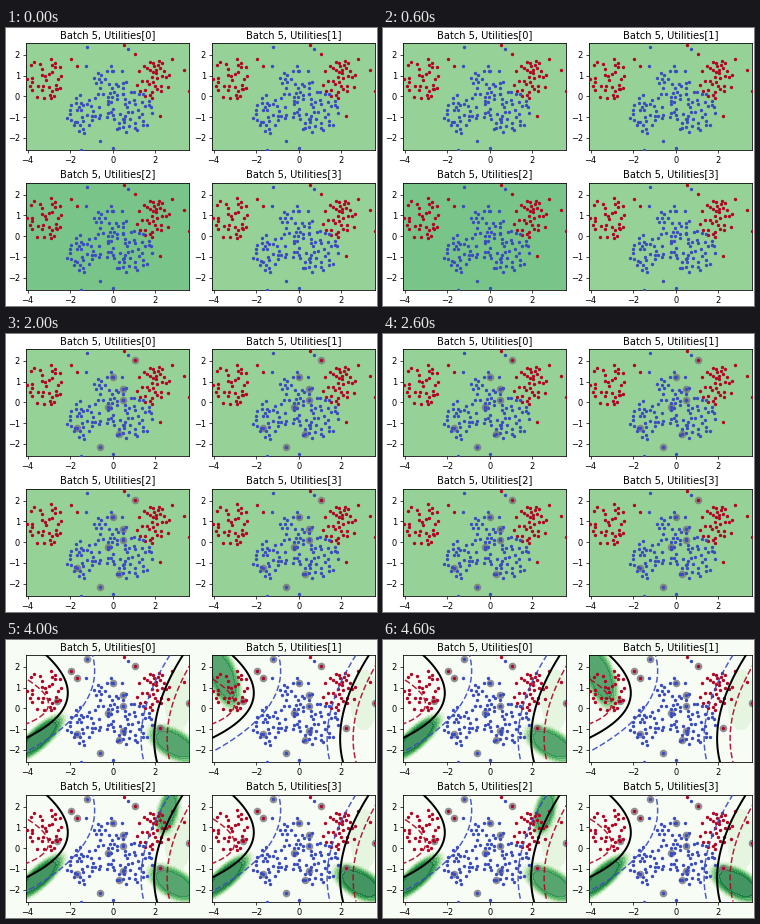
Recreate the animation shown at these times as a matplotlib script. Size 371 by 278 pixels, loop 5 s.

```python
import numpy as np
import matplotlib.pyplot as plt
from matplotlib.animation import FuncAnimation

plt.rcParams["font.family"] = "DejaVu Sans"

W, H, DPI = 371, 278, 72
X0, X1, Y0, Y1 = 20, 183, 15.5, 122.5   # first panel, in pixels
DX, DY = 186, 139.5                     # offset between panels
RED, BLUE, PALE = "#b40426", "#3b4cc0", "#f7fcf5"
ALPHA = .75

rng = np.random.default_rng(12)


def cloud(n, x, y, rx, ry):
    """Random points in an ellipse, kept apart from each other."""
    pts = []
    while len(pts) < n:
        p = rng.uniform(-1, 1, 2)
        q = p * (rx, ry) + (x, y)
        if p @ p < 1 and all(np.hypot(*(q - o)) > 3 for o in pts):
            pts.append(q)
    return pts


# Labelled points, four more per step
queries = np.array([
    (71, 94), (107, 43), (117, 55), (117, 66),
    (129, 26), (102, 73), (94, 113), (113, 100),
    (65, 31), (71, 38), (183, 63), (117, 91),
    (81, 19), (51, 61), (154, 88),
])
is_red = np.isin(np.arange(len(queries)), [4, 8, 9, 10, 13, 14])

red = np.vstack([
    queries[is_red], [(118, 17), (166, 31), (178, 42)],
    cloud(34, 39, 49, 18, 24), cloud(36, 147, 51, 17, 19),
])
blue = np.vstack([
    queries[~is_red], [(122, 21), (107, 120), (75, 122), (80, 38)],
    cloud(34, 78, 86, 18, 20), cloud(26, 105, 55, 18, 17),
    cloud(46, 124, 84, 24, 22),
])

# Boundary as three Bezier points, and the way to its blue margin
boundaries = {
    3: [([(20, 66), (75, 66), (82, 15)], [(0, 8), (10, 8), (12, 0)]),
        ([(177, 15), (142, 68), (175, 122)], (-8, 0))],
    4: [([(40, 15), (92, 63), (20, 98)], [(42, -12), (18, 0), (0, 14)]),
        ([(177, 15), (139, 75), (151, 122)], (-13, 0))],
}

# Places of high utility: x, y, radii, tilt
spot_a = (30, 56, 10, 4, 0)
spot_b = (63, 51, 11, 5, -10)
summit = (80, 13, 22, 13, 0)
east = (172, 92, 32, 21, 50)
north_east = (174, 27, 24, 17, -45)
band = (33, 98, 32, 10, -42)
corner = (168, 104, 28, 14, 30)
west = (31, 36, 14, 34, -20)
ridge = (162, 32, 10, 24, 15)
edge = (172, 60, 14, 32, 0)

utility = {
    3: [{summit: .95, spot_b: .9},
        {east: .5, spot_a: .7, spot_b: .4},
        {spot_a: .8, spot_b: .4},
        {north_east: .9, edge: .3, spot_a: .8, spot_b: .9}],
    4: [{band: .9, corner: .8, edge: .2},
        {west: .8, edge: .2},
        {band: .9, corner: .8, ridge: .8, edge: .2},
        {band: .9, corner: .9, edge: .2}],
}

gx, gy = np.meshgrid(np.linspace(X0, X1, 50), np.linspace(Y0, Y1, 36))


def field(patches):
    z = np.zeros_like(gx)
    for (x, y, rx, ry, tilt), height in patches.items():
        c, s = np.cos(np.radians(tilt)), np.sin(np.radians(tilt))
        u = ((gx - x) * c + (gy - y) * s) / rx
        v = ((gy - y) * c - (gx - x) * s) / ry
        z = np.maximum(z, height * np.exp(-(u * u + v * v) ** 3))
    return z


def bezier(points):
    t = np.linspace(0, 1, 80)[:, None]
    a, b, c = points
    return ((1 - t) ** 2 * a + 2 * t * (1 - t) * b + t ** 2 * c).T


fig = plt.figure(figsize=(W / DPI, H / DPI), dpi=DPI)
axes = []
for k in range(4):
    left, top = X0 + DX * (k % 2), Y0 + DY * (k // 2)
    axes.append(fig.add_axes([left / W, 1 - (top + Y1 - Y0) / H,
                              (X1 - X0) / W, (Y1 - Y0) / H]))


def draw_utility(ax, k, step):
    if step in utility:
        ax.set_facecolor(PALE)
        ax.contourf(gx, gy, field(utility[step][k]), np.linspace(.1, 1, 10),
                    cmap="Greens", vmin=0, vmax=1, alpha=ALPHA, zorder=0)
    else:
        level = .6 if (step, k) == (0, 2) else .5
        shade = np.array(plt.cm.Greens(level)[:3])
        ax.set_facecolor(shade * ALPHA + 1 - ALPHA)


def draw_boundaries(ax, step):
    for points, margin in boundaries.get(step, []):
        points, margin = np.array(points), np.array(margin)
        ax.plot(*bezier(points), color="k", lw=2, zorder=4)
        for sign, color in ((-1, RED), (1, BLUE)):
            ax.plot(*bezier(points + sign * margin), color=color, lw=1.5,
                    ls=(0, (4, 1.8)), alpha=.9, zorder=4)


def draw_panel(ax, k, step):
    ax.clear()
    draw_utility(ax, k, step)
    draw_boundaries(ax, step)
    ax.scatter(*queries[:4 * step].T, s=58, c="#77777c", alpha=.8,
               linewidths=0, zorder=2)
    for pts, color in ((red, RED), (blue, BLUE)):
        ax.scatter(*pts.T, s=11.5, c=color, linewidths=0, zorder=3)
    ax.set(xlim=(X0, X1), ylim=(Y1, Y0))
    ax.set_xticks([21.5 + 42.6 * i for i in range(4)],
                  ["\u22124", "\u22122", "0", "2"])
    ax.set_yticks([27 + 20.75 * i for i in range(5)],
                  ["2", "1", "0", "\u22121", "\u22122"])
    ax.tick_params(labelsize=8.2, length=3, width=.7, pad=3)
    for spine in ax.spines.values():
        spine.set_linewidth(.8)
    ax.set_title(f"Batch 5, Utilities[{k}]", fontsize=9.85, pad=5.6)


def update(step):
    fig.set_facecolor("white" if step < 3 else PALE)
    for k, ax in enumerate(axes):
        draw_panel(ax, k, step)
    return axes


anim = FuncAnimation(fig, update, frames=5, interval=1000, repeat=True,
                     repeat_delay=0, blit=False)
plt.show()
```
